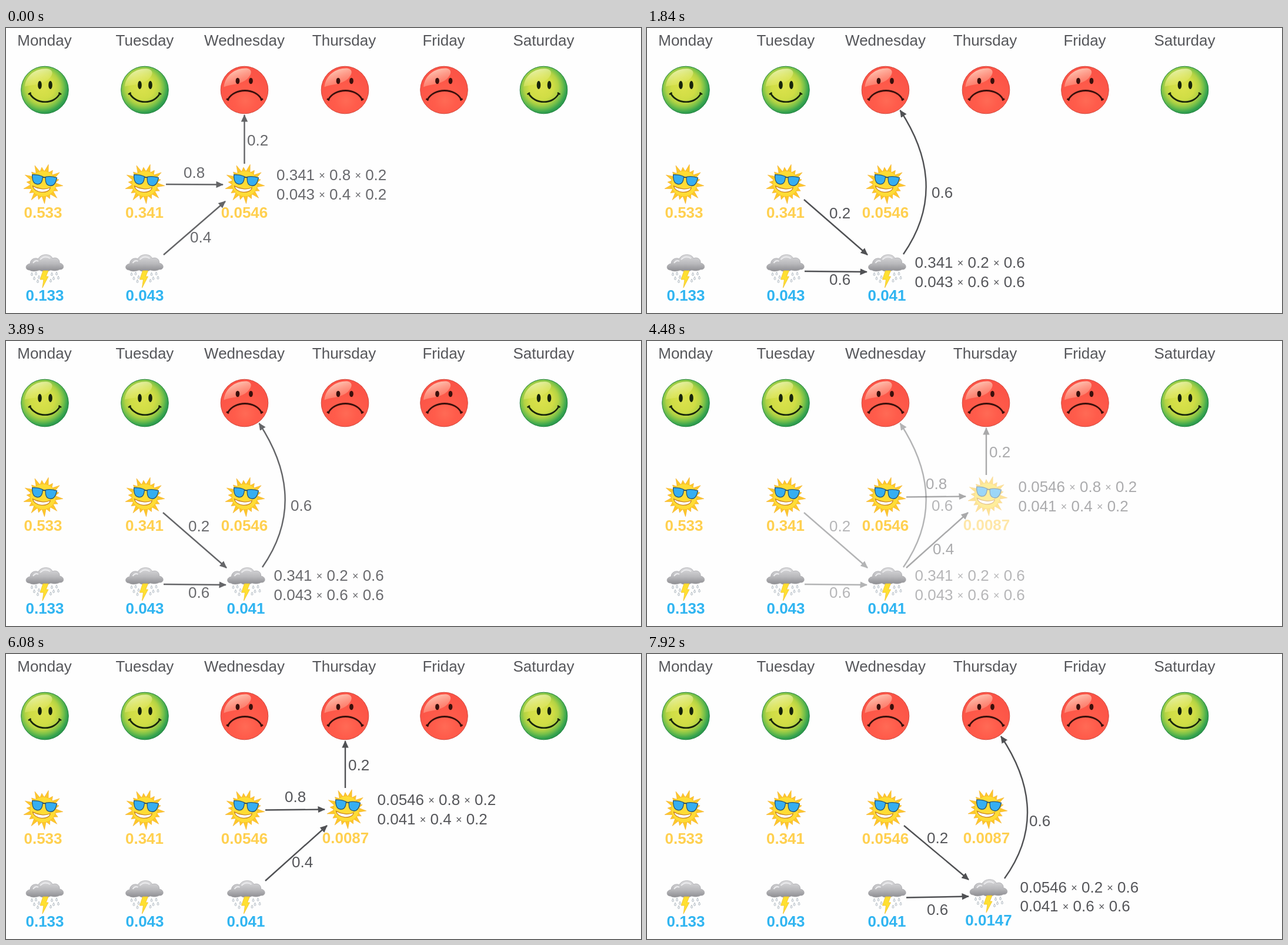
Recreate the animation shown at these times as an HTML page. Size 1080 px wide and 485 px high, loop 8000 ms.

```html
<!DOCTYPE html>
<html lang="en">
<head>
<meta charset="utf-8">
<title>Weather and mood</title>
<style>
  html, body { margin: 0; height: 100%; overflow: hidden; background: #fefefe; }
  svg { display: block; width: 1080px; height: 485px; }
  text { font: 26px "Liberation Sans", Arial, sans-serif; fill: #55565a; white-space: pre; }
  .value { font-weight: bold; text-anchor: middle; }
  .sunny { fill: #ffd050; }
  .stormy { fill: #31b5f1; }
  .day { text-anchor: middle; }
  .times { font-size: 18px; baseline-shift: 2px; }
  .arrow { fill: none; stroke: #505154; stroke-width: 2.4; marker-end: url(#head); }
</style>
</head>
<body>
<svg id="stage" viewBox="0 0 1080 485">
  <defs>
    <marker id="head" markerUnits="userSpaceOnUse" markerWidth="13" markerHeight="12" refX="11.5" refY="6" orient="auto">
      <path d="M0 0.3L12.5 6L0 11.7Z" fill="#505154"/>
    </marker>
    <radialGradient id="green" cx=".45" cy=".44" r=".6">
      <stop offset="0" stop-color="#dbe24c"/>
      <stop offset=".42" stop-color="#d0dd45"/>
      <stop offset=".6" stop-color="#b3d344"/>
      <stop offset=".75" stop-color="#72bf4a"/>
      <stop offset=".88" stop-color="#36a34f"/>
      <stop offset="1" stop-color="#1f8c47"/>
    </radialGradient>
    <radialGradient id="red" cx=".52" cy=".72" r=".65">
      <stop offset="0" stop-color="#ff6a55"/>
      <stop offset=".35" stop-color="#ff5c4b"/>
      <stop offset="1" stop-color="#fb5346"/>
    </radialGradient>
    <linearGradient id="greenShine" x1=".1" y1="0" x2=".6" y2="1">
      <stop offset="0" stop-color="#f8facd" stop-opacity=".95"/>
      <stop offset="1" stop-color="#e0e75a" stop-opacity=".3"/>
    </linearGradient>
    <linearGradient id="redShine" x1=".1" y1="0" x2=".6" y2="1">
      <stop offset="0" stop-color="#ffe6d4" stop-opacity=".95"/>
      <stop offset="1" stop-color="#ff9580" stop-opacity=".4"/>
    </linearGradient>
    <linearGradient id="grey" x1="0" y1="0" x2="0" y2="1">
      <stop offset="0" stop-color="#dcdcde"/>
      <stop offset=".55" stop-color="#b8b8bb"/>
      <stop offset="1" stop-color="#8c8c90"/>
    </linearGradient>

    <g id="happy">
      <circle r="40.3" fill="url(#green)" stroke="#23843f" stroke-width="1"/>
      <path d="M-34-6C-32-27-12-38 5-36C15-34 15-26 6-18C-6-8-22-9-34-6Z" fill="url(#greenShine)"/>
      <ellipse cx="-8.5" cy="-8.5" rx="3.3" ry="7" fill="#17240c"/>
      <ellipse cx="9.5" cy="-8.5" rx="3.3" ry="7" fill="#17240c"/>
      <path d="M-25.5 6C-15 25 16 25 25.5 6M-28 7.5L-23.5 4.5M23.5 4.5L28 7.5" fill="none" stroke="#17240c" stroke-width="2.7"/>
    </g>
    <g id="sad">
      <circle r="40.3" fill="url(#red)" stroke="#d2473c" stroke-width="1"/>
      <path d="M-35-5C-33-27-13-38 4-37C14-35 13-27 5-19C-6-9-23-10-35-5Z" fill="url(#redShine)"/>
      <ellipse cx="-11.5" cy="-15.5" rx="3.4" ry="5.3" fill="#3a100c"/>
      <ellipse cx="11" cy="-15.5" rx="3.4" ry="5.3" fill="#3a100c"/>
      <path d="M-28 16C-17-4 19-4 29 16M-30.5 15L-26.5 17.5M27.5 17.5L31.5 15" fill="none" stroke="#3a100c" stroke-width="2.8"/>
    </g>
    <g id="sun">
      <path id="rays" fill="#fdc82a" stroke="#f3ae2a" stroke-width=".6"/>
      <circle r="22" fill="#ffdc35" stroke="#f6b829" stroke-width=".8"/>
      <g transform="rotate(7)">
        <path d="M-17 6C-7 10 5 10 13 5C12 17-13 18-17 6Z" fill="#fff" stroke="#c98420" stroke-width="1.2"/>
        <path d="M-20-11L22-11" stroke="#264a60" stroke-width="1.8"/>
        <g fill="#35aef2" stroke="#2b566f" stroke-width="1.3">
          <path d="M-20-13Q-10-15-2-12Q-1 2-10 2Q-19 2-20-13Z"/>
          <path d="M3-12Q11-15 22-13Q21 2 12 2Q3 2 3-12Z"/>
        </g>
      </g>
    </g>
    <g id="storm">
      <path d="M-26 27C-34 27-34 17-25 16C-25 8-16 5-11 8C-8-1 10-2 13 7C20 4 26 9 25 15C34 16 34 27 25 26C20 29 13 28 10 27C4 30-5 30-9 27C-14 29-22 30-26 27Z" fill="url(#grey)" stroke="#a2a2a6" stroke-width=".7"/>
      <path d="M-20 15Q-16 9-11 12M-8 9Q0 1 9 7" fill="none" stroke="#ececee" stroke-width="2"/>
      <path id="drops" fill="#eef1f4" stroke="#a9b1b9" stroke-width=".8"/>
      <path d="M-3 28L6 28L2 38L6 38L-4 57L-2 43L-8 43Z" fill="#ffe031" stroke="#f0c02a" stroke-width=".8"/>
    </g>
  </defs>
</svg>
<script>
const stage = document.getElementById('stage');
const LOOP = 8000, FADE = 1300;
const starts = [-150, 3730, 6500];

const rays = Array.from({ length: 36 }, (_, i) => {
  const angle = i * Math.PI / 18 + 0.1;
  const r = i % 2 ? 21 : (i % 4 ? 28 : 34);
  return `${(r * Math.cos(angle)).toFixed(1)} ${(r * Math.sin(angle)).toFixed(1)}`;
});
document.getElementById('rays').setAttribute('d', `M${rays.join('L')}Z`);

const drop = (x, y) => `M${x} ${y}q-3 5 0 5.5q3-.5 0-5.5Z`;
const dropSpots = [[-22, 31], [-15, 30], [-18, 38], [-10, 36], [-12, 43], [12, 31], [20, 30], [15, 38], [23, 37], [10, 42]];
document.getElementById('drops').setAttribute('d', dropSpots.map(([x, y]) => drop(x, y)).join(''));

const text = (x, y, content, cls = '') => `<text x="${x}" y="${y}" class="${cls}">${content}</text>`;
const icon = (name, x, y) => `<use href="#${name}" x="${x}" y="${y}"/>`;
const arrow = d => `<path class="arrow" d="${d}"/>`;
const formula = (x, y, factors) =>
  text(x, y, factors.split(' ').join(' <tspan class="times">×</tspan> '));
const sun = (x, y, labelX, value) => icon('sun', x, y) + text(labelX, y + 58, value, 'value sunny');
const storm = (x, y, labelX, value) => icon('storm', x, y) + text(labelX, y + 79, value, 'value stormy');
const group = (id, content) => `<g id="${id}">${content}</g>`;

const days = [
  ['Monday', 65.5, 66, 'happy'], ['Tuesday', 236, 236, 'happy'], ['Wednesday', 405.5, 405.5, 'sad'],
  ['Thursday', 575, 576.5, 'sad'], ['Friday', 744.5, 745, 'sad'], ['Saturday', 914.5, 914.5, 'happy']
];

// Each step's arrows and sums fade away; the icon it reveals stays.
const steps = [
  arrow('M405.5 231V148') + arrow('M272 266L369 266.5') + arrow('M268 386L373 295') +
  text(410, 200, '0.2') + text(302, 255, '0.8') + text(313, 365, '0.4') +
  formula(460, 259, '0.341 0.8 0.2') + formula(460, 292, '0.043 0.4 0.2'),

  arrow('M267 292L375 386') + arrow('M268 414L374 415') + arrow('M436 385Q516 270 430.5 140') +
  text(310, 324, '0.2') + text(310, 437, '0.6') + text(484, 289, '0.6') +
  formula(455.5, 408, '0.341 0.2 0.6') + formula(455.5, 441, '0.043 0.6 0.6'),

  arrow('M577 228V148') + arrow('M441 265.5L542 264.5') + arrow('M441 386L546 292') +
  text(582, 198, '0.2') + text(474, 252, '0.8') + text(486, 363, '0.4') +
  formula(631.5, 257, '0.0546 0.8 0.2') + formula(631.5, 290, '0.041 0.4 0.2'),

  arrow('M437 292L547 384') + arrow('M441 414.5L547 412.5') + arrow('M608 382Q689 270 602 140') +
  text(476, 322, '0.2') + text(476, 444, '0.6') + text(650, 293, '0.6') +
  formula(634.5, 406, '0.0546 0.2 0.6') + formula(634.5, 438, '0.041 0.6 0.6')
];
const reveals = [
  storm(408.5, 385, 408, '0.041'),
  sun(579, 263.5, 577.5, '0.0087'),
  storm(581, 383, 581, '0.0147')
];

stage.insertAdjacentHTML('beforeend',
  days.map(([name, textX, faceX, face]) => text(textX, 30, name, 'day') + icon(face, faceX, 105.5)).join('') +
  sun(63, 265, 63, '0.533') + sun(236, 265, 235.5, '0.341') + sun(406, 265, 405.5, '0.0546') +
  storm(66, 385, 66, '0.133') + storm(235.5, 385, 236, '0.043') +
  reveals.map((content, i) => group(`reveal${i}`, content)).join('') +
  steps.map((content, i) => group(`step${i}`, content)).join(''));

const clamp = v => Math.min(1, Math.max(0, v));
const setOpacity = (id, value) => document.getElementById(id).setAttribute('opacity', value);

function draw(now) {
  const t = now % LOOP;
  const progress = starts.map(start => clamp((t - start) / FADE));
  // New parts appear a little after the old ones start to fade.
  const shown = progress.map(p => clamp((p - 0.18) / 0.82));
  reveals.forEach((_, i) => setOpacity(`reveal${i}`, shown[i]));
  steps.forEach((_, i) => {
    const fadeIn = i ? shown[i - 1] : 1;
    const fadeOut = i < progress.length ? 1 - progress[i] : 1;
    setOpacity(`step${i}`, fadeIn * fadeOut);
  });
  requestAnimationFrame(draw);
}
draw(performance.now());
</script>
</body>
</html>
```
